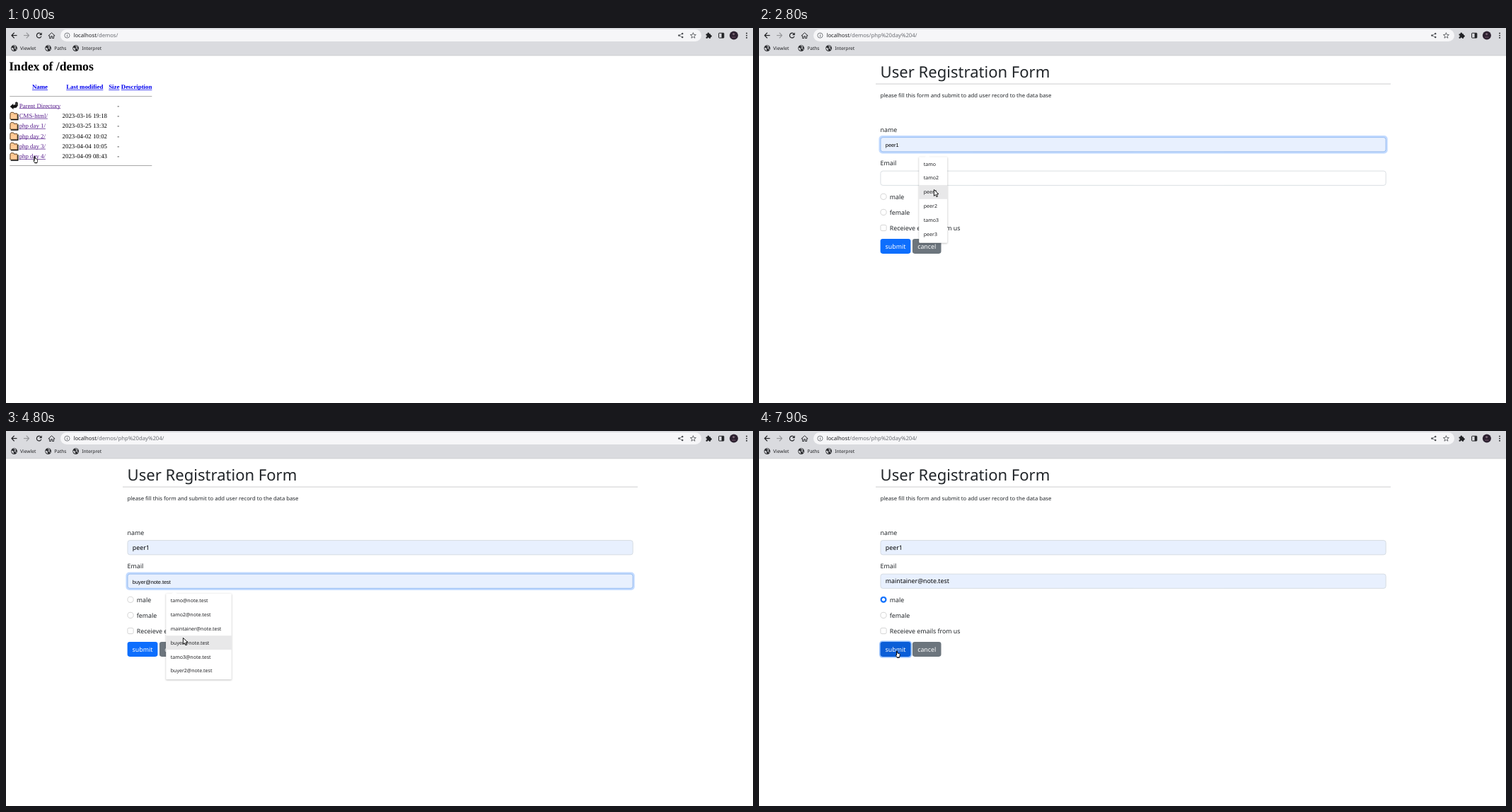
These frames come from a looping animation (1056 by 530 pixels, 8000 ms). An HTML page with a canvas:

```html
<!DOCTYPE html>
<html lang="en">
<head>
<meta charset="utf-8">
<title>Registration form demo</title>
<style>
html, body { margin: 0; width: 100%; height: 100%; overflow: hidden; background: #fff; }
canvas { display: block; width: 1056px; height: 530px; }
</style>
</head>
<body>
<canvas id="stage" width="1056" height="530"></canvas>
<script>
const ctx = document.getElementById('stage').getContext('2d');
const LOOP = 8000, STEP = 100;
const SANS = '"Noto Sans", sans-serif';
const SERIF = '"Liberation Serif", serif';
const ARIAL = '"Liberation Sans", sans-serif';
const BODY = 8.82, INK = '#212529', BLUE = '#0d6efd', FILLED = '#e8f0fe';
const LEFT = 171.6, RIGHT = 886.5;

const NAMES = ['tamo', 'tamo2', 'peer1', 'peer2', 'tamo3', 'peer3'];
const MAILS = ['tamo', 'tamo2', 'maintainer', 'buyer', 'tamo3', 'buyer2'].map(n => n + '@note.test');

// [time, x, y, shape]
const POINTER = [
  [0, 39, 181, 'hand'], [1000, 39, 181, 'arrow'],
  [1300, 88, 178, 'arrow'], [1400, 168, 167, 'arrow'], [1500, 205, 163.5, 'beam'], [1900, 205, 163, 'beam'],
  [2800, 247, 228, 'arrow'], [3700, 244, 219, 'arrow'], [3800, 236, 212, 'beam'],
  [4300, 237, 230, 'arrow'], [4400, 239, 240, 'arrow'], [4500, 242, 256, 'arrow'],
  [4600, 245, 272, 'arrow'], [4700, 248, 284, 'arrow'], [4800, 250, 292, 'arrow'], [4900, 251, 296, 'arrow'],
  [5100, 252, 284, 'arrow'], [5200, 252, 272, 'arrow'], [5500, 252, 270, 'arrow'], [5700, 251, 266, 'arrow'],
  [5900, 238, 262, 'arrow'], [6000, 212, 252, 'arrow'], [6100, 186, 243, 'arrow'], [6200, 174.3, 240, 'arrow'],
  [7000, 174.8, 246, 'arrow'], [7100, 175, 258, 'arrow'], [7200, 175.2, 270, 'arrow'], [7300, 175.4, 277, 'arrow'],
  [7500, 179, 286, 'arrow'], [7600, 187, 300, 'hand'], [7700, 193.5, 310.5, 'hand']
];

const between = (t, a, b) => t >= a && t < b;
const ramp = (t, a, d) => Math.min(1, Math.max(0, (t - a) / d));

function text(str, x, y, size, color, o = {}) {
  ctx.font = `${o.bold ? 'bold ' : ''}${size}px ${o.font || SANS}`;
  ctx.textAlign = o.align || 'left';
  ctx.fillStyle = color;
  ctx.fillText(str, x, y);
  const w = ctx.measureText(str).width;
  if (o.underline) ctx.fillRect(x, y + 0.8, w, 0.7);
  return w;
}

function box(x, y, w, h, r, fill, stroke, lw = 0.7) {
  ctx.beginPath();
  ctx.roundRect(x, y, w, h, r);
  if (fill) { ctx.fillStyle = fill; ctx.fill(); }
  if (stroke) { ctx.strokeStyle = stroke; ctx.lineWidth = lw; ctx.stroke(); }
}

function disc(x, y, r, fill, stroke, lw = 0.7) {
  box(x - r, y - r, 2 * r, 2 * r, r, fill, stroke, lw);
}

function line(pts, color, lw, fill) {
  ctx.beginPath();
  pts.forEach(([x, y], i) => i ? ctx.lineTo(x, y) : ctx.moveTo(x, y));
  if (fill) { ctx.closePath(); ctx.fillStyle = fill; ctx.fill(); }
  ctx.strokeStyle = color;
  ctx.lineWidth = lw;
  ctx.stroke();
}

function at(x, y, draw) {
  ctx.save();
  ctx.transform(1, 0, 0, 1, x, y);
  draw();
  ctx.restore();
}

function arrowIcon(x, dir, color) {
  at(x, 10.5, () => {
    ctx.scale(dir, 1);
    line([[3.8, 0], [-3.5, 0]], color, 1.2);
    line([[0, -3.8], [-3.7, 0], [0, 3.8]], color, 1.2);
  });
}

function globe(x) {
  at(x, 28.6, () => {
    disc(0, 0, 4.4, '#28292c');
    line([[-3.4, -0.8], [-1, 0.2], [-1, 1.6], [-0.2, 3.4], [-2, 2.6], [-3.6, 0.8]], '#dadbdf', 0.2, '#dadbdf');
    line([[-0.6, -3.2], [1.8, -2.8], [2.2, -1.4], [0.6, -1], [0.2, 0], [2.4, 0.4], [3, 2]], '#dadbdf', 0.9);
  });
}

function toolbar(t) {
  const dark = '#202124', grey = '#5f6368';
  ctx.fillStyle = '#dadbdf';
  ctx.fillRect(0, 0, 1056, 39);
  ctx.fillStyle = '#c6c7ca';
  ctx.fillRect(0, 38.6, 1056, 0.7);
  box(77, 2, 906, 17, 8.5, '#f6f6f8');

  arrowIcon(11.7, 1, dark);
  arrowIcon(28.8, -1, '#97989c');
  at(46.8, 10.5, () => {
    if (between(t, 700, 900)) {
      line([[-3, -3], [3, 3]], dark, 1.2);
      line([[3, -3], [-3, 3]], dark, 1.2);
      return;
    }
    ctx.beginPath();
    ctx.arc(0, 0, 3.4, 0.35, 5.5);
    ctx.strokeStyle = dark;
    ctx.lineWidth = 1.2;
    ctx.stroke();
    line([[3.8, -4], [3.8, -0.4], [0.2, -0.4]], dark, 0.1, dark);
  });
  at(64.5, 10.7, () => line([[-4.6, 0.2], [0, -4], [4.6, 0.2], [3, 0.2], [3, 3.8], [1, 3.8], [1, 1],
    [-1, 1], [-1, 3.8], [-3, 3.8], [-3, 0.2], [-4.6, 0.2]], dark, 0.9));

  disc(86.4, 10.5, 3.6, null, grey, 0.8);
  ctx.fillStyle = grey;
  ctx.fillRect(86, 10, 0.9, 2.5);
  ctx.fillRect(86, 8.4, 0.9, 0.9);
  const host = text('localhost', 95.4, 13.3, 7.72, dark);
  text(t < 700 ? '/demos/' : '/demos/php%20day%204/', 95.4 + host, 13.3, 7.72, '#6a6d72');

  at(953.8, 10.5, () => {
    const nodes = [[2.4, -2.6], [-2.4, 0], [2.4, 2.6]];
    line(nodes, grey, 0.8);
    nodes.forEach(([x, y]) => disc(x, y, 1.25, '#4a4c50'));
  });
  at(971.4, 10.8, () => {
    const star = [...Array(11)].map((_, i) => {
      const a = -Math.PI / 2 + i * Math.PI / 5, r = i % 2 ? 1.8 : 4.2;
      return [r * Math.cos(a), r * Math.sin(a)];
    });
    line(star, '#4a4c50', 0.8);
  });
  at(993.3, 10.8, () => {
    box(-3.8, -2.5, 6.6, 6.4, 0.8, dark);
    disc(-0.5, -2.8, 1.4, dark);
    disc(3, 0.7, 1.4, dark);
    disc(-3.7, 0.7, 1.2, '#dadbdf');
    disc(-0.5, 3.8, 1.2, '#dadbdf');
  });
  box(1007.6, 7.2, 7.2, 6.8, 0.6, null, dark, 1);
  ctx.fillStyle = dark;
  ctx.fillRect(1011.6, 7.2, 3.2, 6.8);
  disc(1028.9, 10.5, 6, '#2c2130');
  disc(1028.6, 8.6, 1.6, '#75606f');
  box(1026, 12, 5.6, 2, 1, '#503b4c');
  [-3.2, 0, 3.2].forEach(d => disc(1047, 10.6 + d, 0.95, dark));

  [[11.5, 'Viewlet'], [59.6, 'Paths'], [98.6, 'Interpret']].forEach(([x, label]) => {
    globe(x);
    text(label, x + 8.6, 31, 6.6, dark);
  });
}

function folder(y) {
  at(5.5, y, () => {
    line([[1.2, 11], [11.4, 11], [11.4, 3.2]], '#000', 1.3);
    line([[0.4, 2.4], [1.6, 0.7], [5, 0.7], [6, 2.2], [10.4, 2.2], [10.4, 10], [0.4, 10]], '#5a3a18', 0.6, '#ffcc99');
    line([[0.5, 3.8], [10.2, 3.8]], '#e8a868', 0.5);
    line([[0.4, 10], [0.4, 2.4], [1.6, 0.7], [5, 0.7], [6, 2.2], [10.4, 2.2]], '#5a3a18', 0.6);
  });
}

function indexPage(t) {
  const link = '#0000ee', seen = '#551a8b';
  const serif = { font: SERIF }, under = { font: SERIF, underline: true };
  const head = { font: SERIF, underline: true, bold: true };
  text('Index of /demos', 4.2, 59.7, 17.65, '#000', { font: SERIF, bold: true });
  [['Name', 37], ['Last modified', 85.2], ['Size', 145.2], ['Description', 162.8]]
    .forEach(([s, x]) => text(s, x, 86.2, BODY, link, head));
  ctx.fillStyle = '#a0a0a0';
  ctx.fillRect(5.3, 96.2, 201, 0.9);
  ctx.fillRect(5.3, 194, 201, 0.9);

  at(5.5, 103.6, () => {
    line([[0.4, 7.5], [4.6, 3.6], [4.6, 5.6], [8, 4.6], [7.6, 2], [9, 0.8], [11, 2], [11.2, 6], [9, 9],
      [4.8, 9.4], [4.8, 11.2]], '#000', 0.3, '#111');
    line([[8.6, 2], [9.6, 3.2], [9.4, 5.6]], '#999', 0.6);
  });
  const rows = [['Parent Directory', ''], ['CMS-html/', '2023-03-16 19:18'], ['php day 1/', '2023-03-25 13:32'],
    ['php day 2/', '2023-04-02 10:02'], ['php day 3/', '2023-04-04 10:05'], ['php day 4/', '2023-04-09 08:43']];
  rows.forEach(([name, date], i) => {
    const y = 112.6 + i * 14.34;
    if (i) folder(y - 8.3);
    text(name, 18.7, y, BODY, i === 5 && t >= 600 ? '#ff0000' : seen, under);
    text(date, 143, y, BODY, '#000', { font: SERIF, align: 'right' });
    text('-', 157.3, y, BODY, '#000', serif);
  });
}

function field(y, focus, fill, value, preview, caret) {
  const w = RIGHT - LEFT, h = 20.9;
  if (focus) box(LEFT - 2.2 * focus, y - 2.2 * focus, w + 4.4 * focus, h + 4.4 * focus, 5, `rgba(13,110,253,${0.25 * focus})`);
  box(LEFT + 0.3, y + 0.3, w - 0.6, h - 0.6, 3.2, fill);
  box(LEFT + 0.3, y + 0.3, w - 0.6, h - 0.6, 3.2, null, '#ced4da', 0.75);
  if (focus) {
    ctx.globalAlpha = focus;
    box(LEFT + 0.3, y + 0.3, w - 0.6, h - 0.6, 3.2, null, '#86b7fe', 0.75);
    ctx.globalAlpha = 1;
  }
  const width = preview ? text(preview, 178.8, y + 13.9, 7.35, '#000', { font: ARIAL })
    : text(value, 178.8, y + 13.6, BODY, '#000');
  if (caret) {
    ctx.fillStyle = '#000';
    ctx.fillRect(178.9 + width, y + 4.9, 0.7, 11.6);
  }
}

function popup(y, w, items, hover) {
  ctx.save();
  ctx.shadowColor = 'rgba(0,0,0,.3)';
  ctx.shadowBlur = 2.5;
  ctx.shadowOffsetY = 0.8;
  box(226.2, y, w, 121.6, 1.2, '#fff');
  ctx.restore();
  line([[234.5, y + 0.3], [238, y - 3], [241.5, y + 0.3]], '#fff', 0.2, '#fff');
  items.forEach((s, i) => {
    const mid = y + 9.9 + i * 19.85;
    if (i === hover) {
      ctx.fillStyle = '#e8e8e9';
      ctx.fillRect(226.2, mid - 9.9, w, 19.85);
    }
    text(s, 232.8, mid + 2.5, 7, '#202124');
  });
}

function radio(y, checked, focus) {
  if (focus) disc(176, y, 4.4 + 2.2 * focus, `rgba(13,110,253,${0.25 * focus})`);
  const edge = focus ? '#86b7fe' : checked ? BLUE : '#bfbfbf';
  disc(176, y, 4.1, checked ? BLUE : '#fff', edge, 0.65);
  if (checked) disc(176, y, 2.2, '#fff');
}

function button(x, w, label, color) {
  box(x, 298, w, 20.9, 3.3, color);
  text(label, x + w / 2, 311.6, BODY, '#fff', { align: 'center' });
}

function formPage(t) {
  text('User Registration Form', LEFT, 69.5, 22.06, INK);
  ctx.fillStyle = '#c8c9ca';
  ctx.fillRect(165, 78.6, 728, 0.9);
  text('please fill this form and submit to add user record to the data base', LEFT, 98, 7.72, INK);
  text('name', LEFT, 146.6, BODY, INK);
  text('Email', LEFT, 194, BODY, INK);

  const nameFocus = ramp(t, 1950, 150) - ramp(t, 3950, 150);
  const mailFocus = ramp(t, 3950, 150) - ramp(t, 6250, 200);
  const nameHover = t >= 2800 ? 2 : -1;
  const mailHover = t < 4400 ? -1 : t < 4500 ? 0 : t < 4600 ? 1 : t < 4800 ? 2 : t < 5200 ? 3 : 2;
  const nameOpen = between(t, 2200, 3100), mailOpen = between(t, 4100, 5400);

  const namePreview = between(t, 2800, 3100);
  field(154.3, nameFocus, t >= 2800 ? FILLED : '#fff', t >= 3100 ? NAMES[2] : '',
    namePreview && NAMES[2], between(t, 2000, 2800) || between(t, 3100, 3700));
  const mailPreview = mailOpen && mailHover >= 0;
  field(201.8, mailFocus, mailPreview || t >= 5400 ? FILLED : '#fff', t >= 5400 ? MAILS[2] : '',
    mailPreview && MAILS[mailHover], between(t, 4000, 4400) || between(t, 5400, 5900));

  radio(238.3, t >= 6300, ramp(t, 6250, 150) - ramp(t, 7850, 50));
  radio(260.4, false, 0);
  box(171.9, 278.4, 8.2, 8.2, 2, '#fff', '#bfbfbf', 0.65);
  text('male', 184.8, 241.5, BODY, INK);
  text('female', 184.8, 263.6, BODY, INK);
  text('Receieve emails from us', 184.8, 285.6, BODY, INK);

  if (t >= 7900) box(170, 296.4, 46, 24.1, 4.5, 'rgba(49,132,253,.5)');
  button(LEFT, 42.8, 'submit', t >= 7700 ? '#0b5ed7' : t >= 7600 ? '#0c66ea' : BLUE);
  button(216.9, 40.6, 'cancel', '#6c757d');

  if (nameOpen) popup(182.2, 40, NAMES, nameHover);
  if (mailOpen) popup(229.7, 92.6, MAILS, mailHover);
}

const SHAPES = {
  arrow() {
    line([[0.4, 0.4], [0.4, 9.4], [2.5, 7.5], [4, 10.7], [5.5, 10], [4.1, 6.9], [7, 6.7]], '#000', 0.9, '#fff');
  },
  hand() {
    line([[1, 0.5], [2, 0.5], [2.3, 3.6], [5, 4.2], [5.7, 5], [5.5, 7.3], [4.9, 9.7], [1.7, 9.7],
      [0.1, 6.9], [0.2, 6], [1, 6.4]], '#000', 0.8, '#fff');
    line([[1.7, 9.5], [5, 9.5]], '#000', 1.1);
    line([[1, 6.6], [1, 0.5]], '#000', 0.8);
  },
  beam() {
    line([[-1.8, -4.2], [1.8, -4.2]], '#222', 0.9);
    line([[-1.8, 4.2], [1.8, 4.2]], '#222', 0.9);
    line([[0, -4.2], [0, 4.2]], '#222', 1);
  }
};

function draw(now) {
  const t = Math.floor((now % LOOP) / STEP) * STEP;
  ctx.textRendering = 'geometricPrecision';
  ctx.lineJoin = 'round';
  ctx.fillStyle = '#fff';
  ctx.fillRect(0, 0, 1056, 530);
  (t < 700 ? indexPage : formPage)(t);
  toolbar(t);
  const [, x, y, shape] = POINTER.filter(p => p[0] <= t).pop();
  at(x, y, SHAPES[shape]);
}

const start = performance.now();
function tick() {
  draw(performance.now() - start);
  requestAnimationFrame(tick);
}
tick();
</script>
</body>
</html>
```
